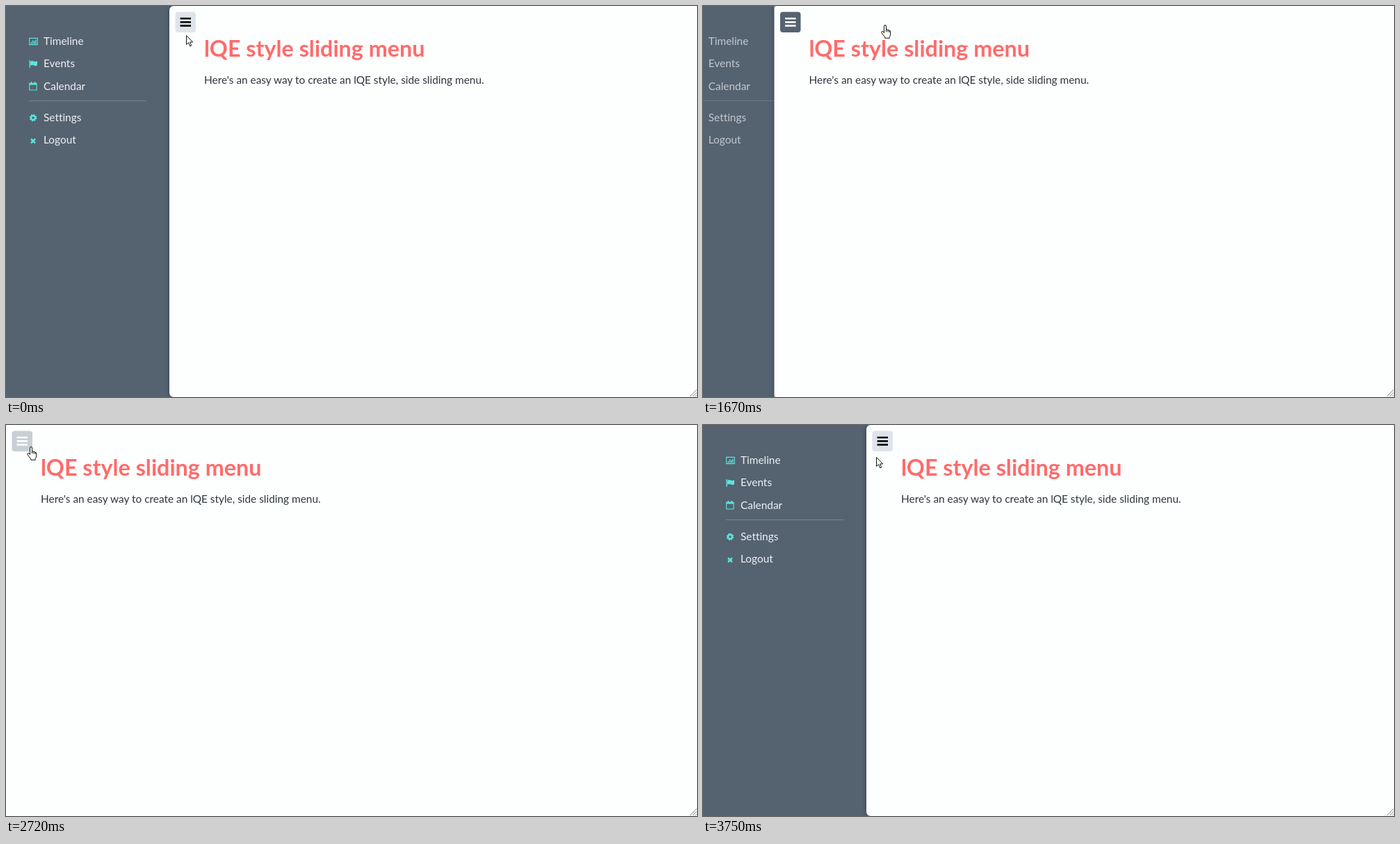
Recreate the animation shown at these times as an HTML page. Size 994 by 563 pixels, loop 4680 ms.

```html
<!DOCTYPE html>
<html lang="en">
<head>
<meta charset="utf-8">
<title>Sliding menu</title>
<style>
  html, body { margin: 0; height: 100%; overflow: hidden; background: #556270; }
  svg { display: block; width: 100vw; height: 100vh; font: 15.4px Lato, "Open Sans", sans-serif; font-variant-ligatures: none; }
  #menu text { fill: #eef1f3; }
  #icons { fill: none; stroke: #58e6da; }
  #icons .solid { fill: #58e6da; stroke: none; }
  #sheet { fill: #fdfefe; filter: drop-shadow(0 0 3px #0005); }
  .title { font-size: 32.3px; font-weight: 700; fill: #ff6b6b; }
  .cursor { fill: #fff; stroke: #111; stroke-linejoin: round; }
</style>
</head>
<body>
<svg viewBox="0 0 994 563">
  <g id="menu">
    <text x="54" y="56">Timeline</text>
    <text x="54" y="88">Events</text>
    <text x="54" y="120.5">Calendar</text>
    <path d="M33 136.5H202" stroke="#78838f"/>
    <text x="54" y="166">Settings</text>
    <text x="54" y="198">Logout</text>
    <g id="icons">
      <path d="M33.6 46.4h11.8v9.2h-11.8z" stroke-width="1.1"/>
      <path d="M36.3 54.5v-2.6M38.5 54.5v-5M40.7 54.5v-4M42.9 54.5v-6" stroke-width="1.4"/>
      <path d="M34 78v11" stroke-width="1.3"/>
      <path class="solid" d="M35 79.8q2.5-1.6 5-.3t5-.2v6.2q-2.5 1.4-5 .1t-5 .6z"/>
      <path d="M33.7 111.4h10.4v9.6h-10.4z" stroke-width="1.1"/>
      <path d="M33.7 112.6h10.4" stroke-width="2"/>
      <path d="M36.4 109v3M41.4 109v3" stroke-width="1.7"/>
      <circle cx="39" cy="161" r="3" stroke-width="2.4"/>
      <circle cx="39" cy="161" r="4.5" stroke-width="1.7" stroke-dasharray="1.9 1.634"/>
      <path d="M36 191.3l6 6m0-6l-6 6" stroke-width="2.5"/>
    </g>
  </g>
  <g id="panel">
    <rect id="sheet" width="1000" height="563"/>
    <rect id="button" x="8.5" y="8.5" width="29.5" height="29.5" rx="4"/>
    <path id="bars" d="M15.6 18H31M15.6 23.2H31M15.6 28.4H31" stroke-width="2.6"/>
    <text class="title" x="50" y="73">lQE style sliding menu</text>
    <text x="50" y="112" fill="#2e3640">Here's an easy way to create an lQE style, side sliding menu.</text>
  </g>
  <path d="M984 562l9.5-9.5M988 562l5.5-5.5M991.5 562l2-2" stroke="#8a8a8a"/>
  <path id="arrow" class="cursor" d="M.5.5V13.5L3.5 10.7L5.7 15.9L7.7 15L5.6 10H9.7Z"/>
  <g id="hand" class="cursor">
    <path d="M-1.5 11.5V2Q-1.5.5 0 .5T1.5 2V7Q3 6.3 3.8 7.5Q5.2 7 5.9 8.3Q7.6 8.2 7.6 10V14Q7.4 16 6.2 17.5V19.3H-.2V18L-5 11.7Q-5.6 9.8-4 9.5Q-3 9.5-1.5 11.5Z"/>
    <path d="M1.5 7v3M3.8 7.5V10.5M5.9 8.3V11" fill="none"/>
  </g>
</svg>
<script>
const LOOP = 4680, OPEN_X = 235, FADE = 300;
const el = id => document.getElementById(id);
const clamp = v => Math.min(1, Math.max(0, v));
const mix = (a, b, k) => a + (b - a) * k;

// The CSS "ease" curve: cubic-bezier(.25, .1, .25, 1)
function ease(x) {
  if (x <= 0 || x >= 1) return clamp(x);
  const bezier = (a, b, s) => 3 * a * s * (1 - s) ** 2 + 3 * b * s * s * (1 - s) + s ** 3;
  let lo = 0, hi = 1;
  for (let i = 0; i < 20; i++) {
    const mid = (lo + hi) / 2;
    if (bezier(.25, .25, mid) < x) lo = mid; else hi = mid;
  }
  return bezier(.1, 1, lo);
}

// Pointer stops: time, x, y
const stops = [
  [0, 259, 42], [1040, 259, 42], [1080, 259, 41], [1350, 262, 27], [1815, 262, 27],
  [1850, 256, 31.5], [2680, 36, 31], [3070, 36, 31], [3100, 59, 31], [3740, 249, 46], [LOOP, 249, 46]
];
const hovers = [[1150, 1828], [2680, 3080]];

function pointerAt(t) {
  const i = stops.findIndex(s => s[0] > t);
  const [t0, x0, y0] = stops[i - 1], [t1, x1, y1] = stops[i];
  const k = (t - t0) / (t1 - t0), s = k * k * (3 - 2 * k);
  return [mix(x0, x1, s), mix(y0, y1, s)];
}

function draw() {
  const t = performance.now() % LOOP;
  const since = start => ease((t - start) / FADE);
  const open = 1 - since(1573) + since(2993);
  const dark = hovers.reduce((sum, [from, to]) => sum + since(from) - since(to), 0);
  const hovered = hovers.some(([from, to]) => t >= from && t < to);

  el("panel").setAttribute("transform", `translate(${OPEN_X * open} 0)`);
  el("sheet").setAttribute("rx", 6 * open);
  el("menu").setAttribute("transform", `translate(${-82 * (1 - open)} 0)`);
  el("menu").setAttribute("opacity", mix(.5, 1, open));
  el("button").setAttribute("fill",
    `rgb(${mix(223, 85, dark)},${mix(228, 98, dark)},${mix(235, 112, dark)})`);
  el("bars").setAttribute("stroke", hovered ? "#fff" : "#000");

  const place = `translate(${pointerAt(t).join(" ")})`;
  for (const [id, shown] of [["arrow", !hovered], ["hand", hovered]]) {
    el(id).setAttribute("transform", place);
    el(id).style.display = shown ? "" : "none";
  }
  requestAnimationFrame(draw);
}
draw();
</script>
</body>
</html>
```
